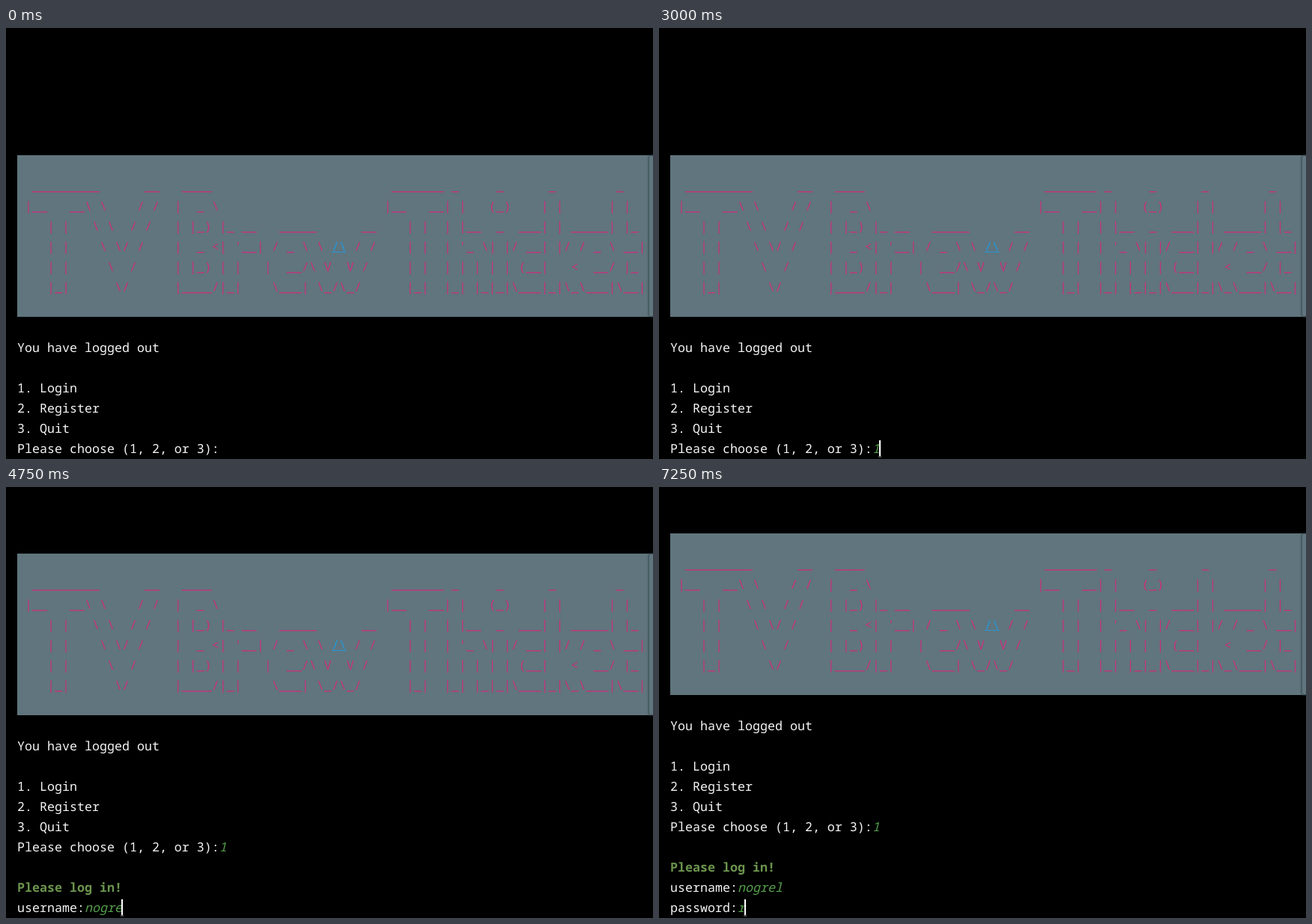
Animation of 864 by 576 pixels, one loop 8 s. Source, as an HTML page:

```html
<!DOCTYPE html>
<html lang="en">
<head>
<meta charset="utf-8">
<title>Terminal login</title>
<style>
  html, body { margin: 0; width: 100%; height: 100%; overflow: hidden; background: #000; }
  #stage {
    position: relative; width: 864px; height: 576px; overflow: hidden;
    background: #000; color: #f5f5f5;
    font: 16.667px/27px "Noto Sans Mono", "DejaVu Sans Mono", monospace;
    text-rendering: geometricPrecision; white-space: pre;
  }
  #screen { position: absolute; left: 15px; right: 0; bottom: 1px; }
  #screen div { height: 27px; }
  #screen #banner {
    position: relative; box-sizing: border-box; height: 216px; padding: 27px 0;
    margin-bottom: 27px; background: #60757d; color: #c9307c;
  }
  #banner b { font-weight: 400; color: #2398dc; text-decoration: underline; }
  #banner i {
    position: absolute; left: 844px; top: 1px; width: 9px; height: 214px;
    border-radius: 2px; background: #60757d; box-shadow: 0 0 3px 1px #34464e;
  }
  .typed { color: #56a04c; font-style: italic; }
  .notice { color: #6b944e; font-weight: 700; }
  #caret { position: absolute; top: 551px; width: 2px; height: 21px; background: #fff; }
  #caret::after {
    content: ""; position: absolute; left: -1px; top: 21px;
    width: 4px; height: 2px; background: #4a4a4a;
  }
</style>
</head>
<body>
<div id="stage">
  <div id="screen"><div id="banner"></div><section id="log"></section></div>
  <div id="caret"></div>
</div>
<script>
const LOOP = 8000, CELL = 10, LEFT = 15;
const USER = "nogrel";

const ART = String.raw`
  _________      __   ____                        _______ _     _      _        _
 |__   __\ \    / /  |  _ \                      |__   __| |   (_)    | |      | |
    | |   \ \  / /   | |_) |_ __   _____      __    | |  | |__  _  ___| | _____| |_
    | |    \ \/ /    |  _ <| '__| / _ \ \ /\ / /    | |  | '_ \| |/ __| |/ / _ \ __|
    | |     \  /     | |_) | |   |  __/\ V  V /     | |  | | | | | (__|   <  __/ |_
    |_|      \/      |____/|_|    \___| \_/\_/      |_|  |_| |_|_|\___|_|\_\___|\__|`.slice(1);

// Each step: start time, caret shown, then the typed choice, user and password.
const STEPS = [
  [0, false, ""],
  [250, true, ""],
  [1000, false, ""],
  [1500, true, ""],
  [1750, false, ""],
  [2750, true, ""],
  [3000, true, "1"],
  [3250, true, "1", ""],
  [4000, false, "1", ""],
  [4250, true, "1", ""],
  [4500, true, "1", USER.slice(0, 3)],
  [4750, true, "1", USER.slice(0, 5)],
  [5500, true, "1", USER],
  [6500, false, "1", USER],
  [6750, true, "1", USER, ""],
  [7250, true, "1", USER, "r"]
];

const byId = id => document.getElementById(id);
const banner = byId("banner"), log = byId("log"), caret = byId("caret");

function make(tag, text = "", cls = "") {
  const el = document.createElement(tag);
  el.textContent = text;
  el.className = cls;
  return el;
}

function drawBanner() {
  const link = "/\\ / /";
  const at = ART.indexOf(" " + link) + 1;
  banner.append(ART.slice(0, at), make("b", ART.slice(at, at + 2)), ART.slice(at + 2), make("i"));
}

function addLine(text, typed = "", cls = "") {
  const line = make("div", text, cls);
  if (typed) line.append(make("span", typed, "typed"));
  log.append(line);
}

function show([, caretOn, choice, user, pass]) {
  log.replaceChildren();
  ["You have logged out", "", "1. Login", "2. Register", "3. Quit"].forEach(t => addLine(t));
  addLine("Please choose (1, 2, or 3):", choice);
  if (user !== undefined) {
    addLine("");
    addLine("Please log in!", "", "notice");
    addLine("username:", user);
  }
  if (pass !== undefined) addLine("password:", pass);
  const column = log.lastChild.textContent.length;
  caret.style.left = LEFT + CELL * column - 1 + "px";
  caret.style.visibility = caretOn ? "visible" : "hidden";
}

let current = null;
function tick() {
  const t = performance.now() % LOOP;
  const step = STEPS.findLast(s => s[0] <= t);
  if (step !== current) show(current = step);
  requestAnimationFrame(tick);
}

drawBanner();
tick();
</script>
</body>
</html>
```
